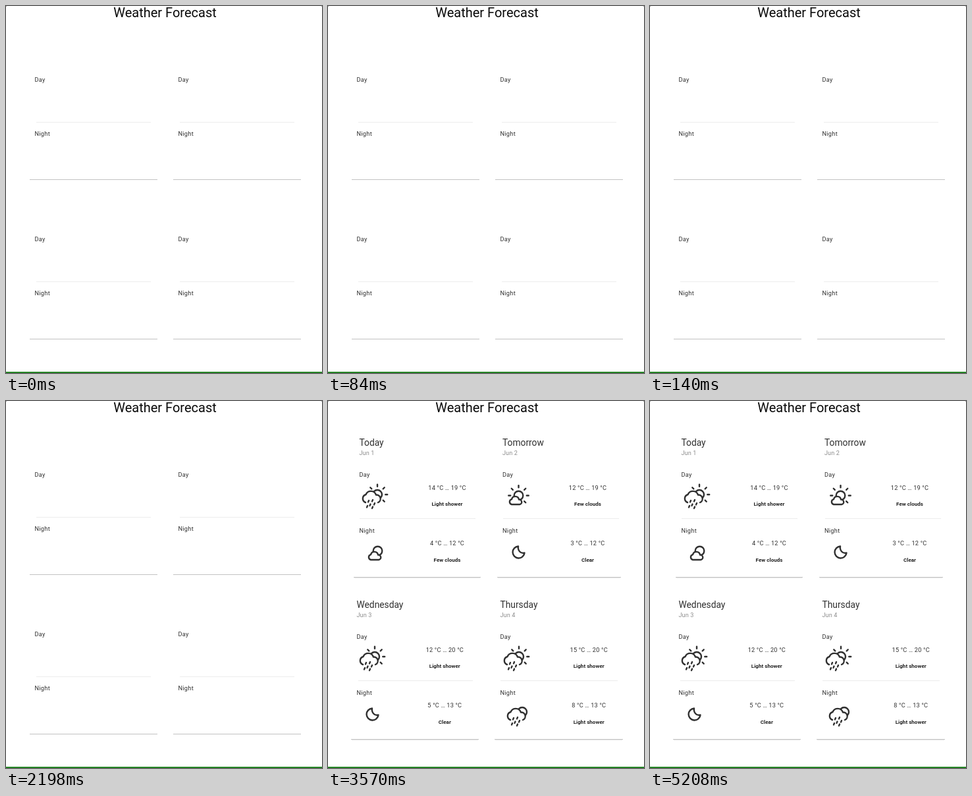
An HTML page with a canvas for the animation above (6300 ms loop, 480x557 px).

```html
<!DOCTYPE html>
<html lang="en">
<head>
<meta charset="utf-8">
<title>Weather Forecast</title>
<style>
html, body { margin: 0; width: 100%; height: 100%; overflow: hidden; background: #fff; }
canvas { display: block; width: 480px; height: 557px; }
</style>
</head>
<body>
<canvas id="view" width="480" height="557"></canvas>
<script>
const ctx = document.getElementById('view').getContext('2d');
const LOOP = 6300, LOADED = 3570;
const INK = '#303030';

const styles = {
  title: ['20px', '#0a0a0a', 0],
  head: ['13.8px', INK, 0],
  date: ['9.1px', '#8c8c8c', 0.1],
  label: ['9.2px', INK, 0.28],
  temp: ['9.2px', INK, 0.2],
  note: ['bold 8px', '#222', 0.05]
};

function text(str, x, y, style, align = 'left') {
  const [font, color, gap] = styles[style];
  ctx.font = font + ' Roboto, sans-serif';
  ctx.fillStyle = color;
  ctx.letterSpacing = gap + 'px';
  ctx.textAlign = align;
  ctx.fillText(str, x, y);
}

function bar(x1, x2, y, color) {
  ctx.fillStyle = color;
  ctx.fillRect(x1, y, x2 - x1, 1);
}

const cloudSmall = new Path2D('M5 14A4 4 0 0 1 5 6.2A5.6 5.6 0 0 1 16 6.6A3.7 3.7 0 0 1 17 14Z');
const cloudBig = new Path2D('M6 21A6.3 6.3 0 0 1 6.5 9A8.3 8.3 0 0 1 22 9.5A6 6 0 0 1 25 21');
const crescent = new Path2D('M10 1.5A9 9 0 1 0 19.5 11.5C13.5 13 9 8 10 1.5Z');

function line(x1, y1, x2, y2) {
  ctx.beginPath();
  ctx.moveTo(x1, y1);
  ctx.lineTo(x2, y2);
  ctx.stroke();
}

function disc(x, y, r) {
  ctx.beginPath();
  ctx.arc(x, y, r, 0, Math.PI * 2);
  ctx.stroke();
}

// Rays at the given multiples of 45 degrees, clockwise from the right
function rays(x, y, steps) {
  for (const s of steps) {
    const c = Math.cos(s * Math.PI / 4), d = Math.sin(s * Math.PI / 4);
    line(x + 12.3 * c, y + 12.3 * d, x + 15.2 * c, y + 15.2 * d);
  }
}

function front(path) {
  ctx.fillStyle = '#fff';
  ctx.fill(path);
  ctx.stroke(path);
}

function rain() {
  const drops = [[11, 18], [17, 17], [20, 22], [13.5, 23.5], [9, 26], [17, 27.5]];
  for (const [x, y] of drops) line(x, y, x - 1, y + 2.4);
}

const icons = {
  shower() { rays(24, 9, [-3, -2, -1, 0, 1]); icons.nightShower(); },
  nightShower() { disc(24, 9, 7); front(cloudBig); rain(); },
  sunny() { rays(15.5, 0.5, [-4, -3, -2, -1, 0, 1]); icons.cloudy(); },
  cloudy() { disc(15.5, 0.5, 6.8); front(cloudSmall); },
  moon() { ctx.stroke(crescent); }
};

function icon(name, x, y) {
  ctx.save();
  ctx.translate(x, y);
  ctx.strokeStyle = INK;
  ctx.lineWidth = 2.4;
  ctx.lineCap = ctx.lineJoin = 'round';
  icons[name]();
  ctx.restore();
}

// left, top, centre of readings, card edges, divider edges, texts, day and night parts
const cards = [
  { x: 47.5, y: 0, mid: 181, edge: [39, 232], rule: [48, 224], head: 'Today', date: 'Jun 1',
    day: ['14 °C … 19 °C', 'Light shower', 'shower', 51, 133],
    night: ['4 °C … 12 °C', 'Few clouds', 'cloudy', 60, 227] },
  { x: 265, y: 0, mid: 394.5, edge: [257, 445], rule: [266, 442], head: 'Tomorrow', date: 'Jun 2',
    day: ['12 °C … 19 °C', 'Few clouds', 'sunny', 274, 143],
    night: ['3 °C … 12 °C', 'Clear', 'moon', 279, 219] },
  { x: 43.5, y: 246, mid: 177.3, edge: [35, 229], rule: [46, 220], head: 'Wednesday', date: 'Jun 3',
    day: ['12 °C … 20 °C', 'Light shower', 'shower', 47, 379],
    night: ['5 °C … 13 °C', 'Clear', 'moon', 57, 465] },
  { x: 261.5, y: 246, mid: 396.2, edge: [253, 448], rule: [262, 440], head: 'Thursday', date: 'Jun 4',
    day: ['15 °C … 20 °C', 'Light shower', 'shower', 266, 379],
    night: ['8 °C … 13 °C', 'Light shower', 'nightShower', 271, 463] }
];

function half(c, label, [temp, note, name, ix, iy], y) {
  text(label, c.x, y, 'label');
  text(temp, c.mid, y + 19.5, 'temp', 'center');
  text(note, c.mid, y + 44, 'note', 'center');
  icon(name, ix, iy);
}

function card(c) {
  text(c.head, c.x, c.y + 67.5, 'head');
  text(c.date, c.x, c.y + 82, 'date');
  half(c, 'Day', c.day, c.y + 115);
  bar(...c.rule, c.y + 178, '#ececec');
  half(c, 'Night', c.night, c.y + 199.5);
  const [l, r] = c.edge;
  bar(l, r, c.y + 267, '#c4c4c4');
  bar(l + 1, r - 1, c.y + 268, '#e6e6e6');
}

function emptyCard(x, y) {
  text('Day', x + 7.5, y + 115, 'label');
  bar(x + 10, x + 184, y + 176, '#ededed');
  text('Night', x + 7.5, y + 197, 'label');
  bar(x, x + 194, y + 263, '#c2c2c2');
}

function draw(t) {
  ctx.fillStyle = '#fff';
  ctx.fillRect(0, 0, 480, 557);
  text('Weather Forecast', 241.5, 17, 'title', 'center');
  if (t < LOADED) {
    for (const y of [0, 241.5]) for (const x of [36, 254]) emptyCard(x, Math.round(y));
  } else {
    cards.forEach(card);
  }
  bar(0, 1, 0, '#999');
  bar(479, 480, 0, '#999');
  bar(0, 480, 555, '#3d963d');
  bar(0, 480, 556, '#187a18');
}

const start = performance.now();
function tick() {
  draw((performance.now() - start) % LOOP);
  requestAnimationFrame(tick);
}
tick();
</script>
</body>
</html>
```
